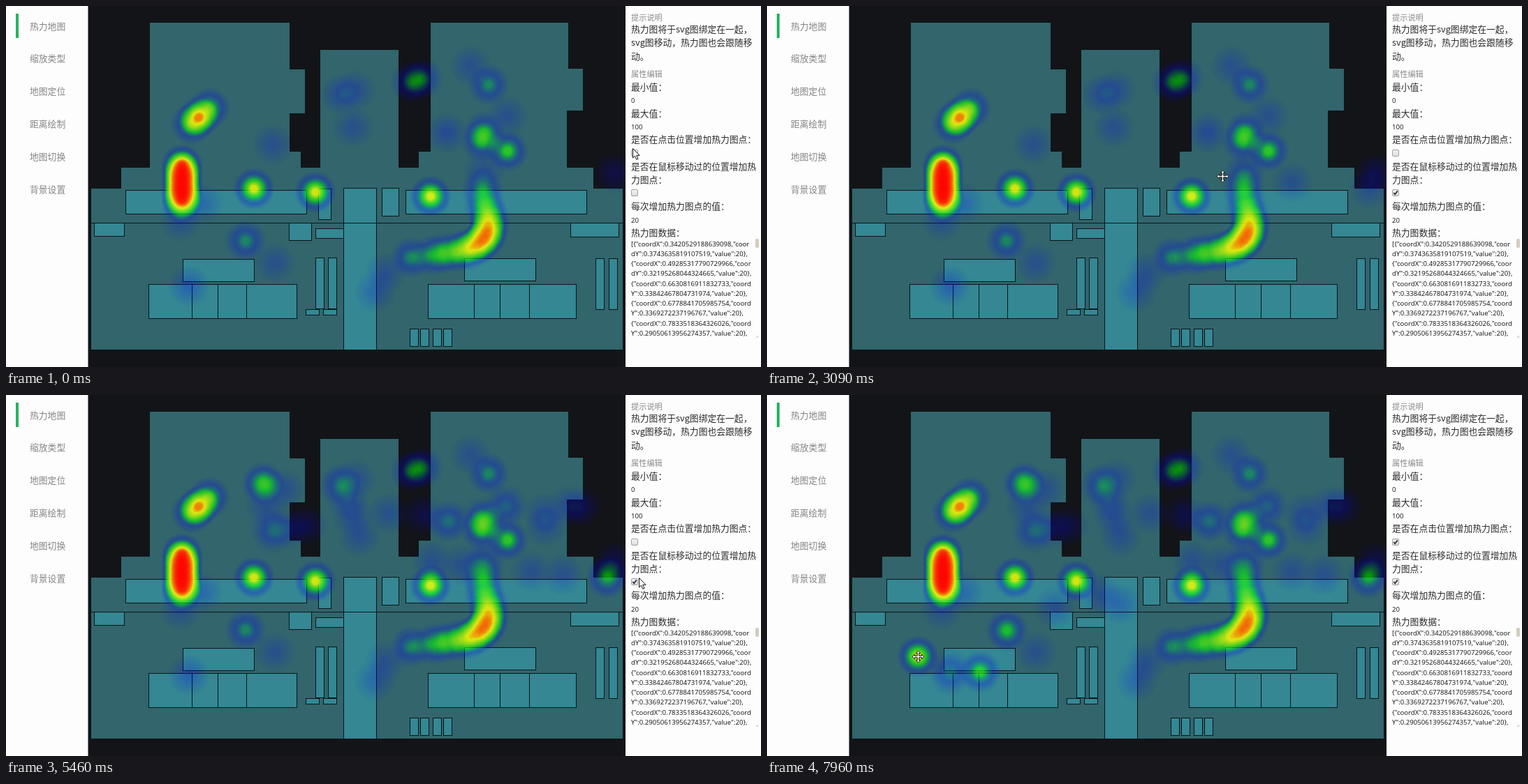
These frames come from a looping animation (1081 px wide and 518 px high, 8000 ms). An HTML page with a canvas:

```html
<!DOCTYPE html>
<html lang="zh-CN">
<head>
<meta charset="utf-8">
<title>热力地图</title>
<style>
html, body { margin: 0; width: 100%; height: 100%; overflow: hidden; background: #fdfdfd; }
#stage { position: relative; width: 1081px; height: 518px; overflow: hidden; font-family: "Noto Sans CJK SC", "Noto Sans CJK", "Noto Sans", sans-serif; }
svg, canvas { position: absolute; left: 0; top: 0; }
.plan { stroke: #0c1618; }
.row { position: absolute; line-height: 20px; white-space: pre; }
.nav { left: 34px; font-size: 12.8px; color: #858585; }
.head { left: 895px; font-size: 11.2px; color: #8a8a8a; }
.body { left: 895px; font-size: 12.8px; color: #2c2c2c; }
.num { left: 895px; font: 9.6px/20px "Open Sans", "Noto Sans", sans-serif; color: #111; }
.bar { position: absolute; left: 14px; top: 11px; width: 4px; height: 35px; background: #27b162; }
#data { position: absolute; left: 895px; top: 334.6px; width: 180px; height: 141px; margin: 0; overflow: hidden; font: 9.6px/14.25px "Open Sans", "Noto Sans", sans-serif; color: #111; }
.thumb { position: absolute; left: 1073px; top: 334px; width: 5px; height: 13px; border-radius: 2px; background: #d3ccc2; }
</style>
</head>
<body>
<div id="stage">
  <svg class="plan" width="1081" height="518">
    <path fill="#131417" stroke="none" d="M117.5 0H887V518H117.5Z"/>
    <path fill="#32656c" d="M205.5 23.5H406.5V90.5H428.5V154.5H406.5V208.5H422.5V231.5H449.5V62.5H562.5V231.5H590.5V208.5H607.5V23.5H805.5V89.5H826.5V150.5H803.5V231.5H841.5V261.5H883.5V493.5H121.5V261.5H164.5V231.5H205.5Z"/>
    <g id="rooms" fill="#348793"></g>
    <path id="walls" d="M121.5 311.5H883.5"/>
  </svg>
  <canvas id="heat" width="769" height="518" style="left:118px"></canvas>
  <div class="bar"></div>
  <pre id="data">[{"coordX":0.3420529188639098,"coor
dY":0.3743635819107519,"value":20},
{"coordX":0.49285317790729966,"coor
dY":0.32195268044324665,"value":20},
{"coordX":0.6630816911832733,"coord
Y":0.33842467804731974,"value":20},
{"coordX":0.6778841705985754,"coord
Y":0.3369272237196767,"value":20},
{"coordX":0.7833518364326026,"coord
Y":0.29050613956274357,"value":20},</pre>
  <div class="thumb"></div>
  <svg width="1081" height="518">
    <defs>
      <linearGradient id="face" x2="0" y2="1"><stop stop-color="#f4f4f4"/><stop offset="1" stop-color="#dcdcdc"/></linearGradient>
      <rect id="box" x=".5" y=".5" width="9" height="9" rx="1.5" fill="url(#face)" stroke="#a0a0a0"/>
      <path id="tick" d="M2.3 5L4.2 7.3L7.8 2.4" fill="none" stroke="#333" stroke-width="1.8"/>
    </defs>
    <use href="#box" x="895" y="206"/>
    <use href="#box" x="895" y="263"/>
    <use id="clickTick" href="#tick" x="895" y="206"/>
    <use id="moveTick" href="#tick" x="895" y="263"/>
    <path d="M1074 476L1077 473M1076 476L1077 475" stroke="#999" stroke-width=".7"/>
    <g id="cursor" fill="#fff" stroke="#111" stroke-linejoin="round">
      <path id="arrow" d="M0 0V13.5L3 10.6L5.2 15.8L7.5 14.8L5.3 9.8H9.6Z"/>
      <g id="cross"></g>
    </g>
  </svg>
</div>
<script>
const LOOP = 8000, RADIUS = 30, LEFT = 118, EDGE = 887, STEP = .2;
const $ = id => document.getElementById(id);
const pairs = s => s.split(" ").map(p => p.split(",").map(Number));

function room(w, h, corners) {
  $("rooms").innerHTML += pairs(corners).map(([x, y]) =>
    `<rect x="${x + .5}" y="${y + .5}" width="${w}" height="${h}"/>`).join("");
}
room(259, 34, "171,264 572,264");
room(18, 44, "447,262");
room(47, 232, "483,261");
room(24, 40, "538,261");
room(43, 19, "126,311");
room(32, 25, "405,311");
room(40, 14, "443,319");
room(69, 20, "808,311");
room(102, 32, "253,363 656,362");
room(212, 49, "204,399 604,399");
room(12, 73, "443,361 461,361 844,362 863,362");
room(19, 8, "429,435 454,435");
room(12, 25, "578,463 593,463 611,463 626,463");

const walls = [266, 303, 344, 670, 707, 749].map(x => `M${x}.5 399V448`).join("");
$("walls").setAttribute("d", $("walls").getAttribute("d") + walls);

// four arms, one per direction
const arm = "L-1.2 -1.2V-5H-3.2L0 -8.5L3.2 -5H1.2V-1.2";
const turned = (part, stroke) => [0, 90, 180, 270].map(a =>
  `<path d="M0 0${part}" transform="rotate(${a})" stroke="${stroke}"/>`).join("");
$("cross").innerHTML = turned(arm, "#111") + `<rect x="-1.2" y="-1.2" width="2.4" height="2.4" stroke="none"/>`;

function row(kind, y, text) {
  const el = document.createElement("div");
  el.className = "row " + kind;
  el.style.top = y - 10.5 + "px";
  el.textContent = text;
  $("stage").append(el);
}
["热力地图", "缩放类型", "地图定位", "距离绘制", "地图切换", "背景设置"]
  .forEach((s, i) => row("nav", 29 + i * 46.8, s));
row("head", 16, "提示说明");
row("body", 33.5, "热力图将于svg图绑定在一起，");
row("body", 52.5, "svg图移动，热力图也会跟随移");
row("body", 72, "动。");
row("head", 97.5, "属性编辑");
row("body", 116, "最小值：");
row("num", 136, "0");
row("body", 154, "最大值：");
row("num", 174.5, "100");
row("body", 191.5, "是否在点击位置增加热力图点：");
row("body", 230, "是否在鼠标移动过的位置增加热");
row("body", 249, "力图点：");
row("body", 287, "每次增加热力图点的值：");
row("num", 308, "20");
row("body", 325, "热力图数据：");

const base = [];
const spots = (v, list) => base.push(...pairs(list).map(p => [...p, v]));
spots(.2, "250,308 281,283 382,199 385,369 500,121 497,174 665,86 718,158 684,238 684,275 871,240 543,383 529,410");
spots(.25, "262,402 480,127 631,182");
spots(.38, "580,110 596,104 610,358 682,262 252,284");
spots(.45, "343,337 691,113 685,181 681,194 580,361");
spots(.6, "291,147 266,169 718,208");
spots(.83, "276,160 355,262 443,267 608,273");
for (let y = 228; y < 280; y += 10) base.push([252, y, .9]);
for (let i = 0; i <= 8; i++) {
  const t = i / 8, u = 1 - t;
  const bend = (a, b, c) => u * u * a + 2 * u * t * b + t * t * c;
  base.push([bend(686, 712, 625), bend(288, 350, 355), .42 + .25 * Math.sin(Math.PI * t)]);
}

// Cursor positions; a hot one leaves a heat point once the cursor steps on.
const path = [];
function visit(start, gap, points, hot = true) {
  points.forEach(([x, y], i) => path.push({ time: start + i * gap, x, y, hot }));
}
const hover = (start, gap, list) => visit(start, gap, pairs(list));
function glide(start, gap, steps, list) {
  const way = pairs(list), last = way.length - 1;
  visit(start, gap, Array.from({ length: steps }, (_, i) => {
    const s = steps > 1 ? i / (steps - 1) * last : 0;
    const n = Math.max(0, Math.min(last - 1, Math.floor(s)));
    const a = way[n], b = way[n + 1] ?? a;
    return a.map((c, k) => Math.round(c + (b[k] - c) * (s - n)));
  }), false);
}
glide(0, 0, 1, "897,204");
glide(90, 78, 8, "895,208 886,235 899,264");
glide(890, 86, 4, "900,258 900,267");
glide(2610, 0, 1, "903,267");
hover(2850, 80, "862,262 752,253 683,246 652,244");
hover(3150, 110, "610,238 506,203 430,188 403,192 380,190");
hover(3680, 70, "372,158 367,130 367,125");
hover(4100, 44, "370,127 370,127 398,135 478,132 490,152 548,170 597,172 637,180 681,175 713,162 770,170 824,160 805,160");
hover(4690, 170, "773,188 797,258");
hover(5030, 100, "862,262 858,262");
glide(5280, 0, 1, "903,268");
glide(5460, 82, 10, "906,262 899,209 899,271");
glide(6290, 76, 4, "897,272 892,272");
glide(6670, 0, 1, "661,296");
hover(6760, 82, "505,300 478,286 412,305 345,340 305,397 305,397 305,397 262,393 216,375");
hover(7510, 180, "216,375 216,375");
hover(7780, 180, "216,375 216,375");

// blue, green, yellow, red
const stops = [[0, 0, 0, 255], [.25, 0, 0, 255], [.55, 0, 255, 0], [.85, 255, 255, 0], [1, 255, 0, 0]];
const palette = Array.from({ length: 256 }, (_, n) => {
  const v = n / 255;
  const i = Math.max(1, stops.findIndex(s => s[0] >= v));
  const a = stops[i - 1], b = stops[i], k = (v - a[0]) / (b[0] - a[0]);
  return [1, 2, 3].map(c => a[c] + (b[c] - a[c]) * k);
});

const canvas = $("heat");
const ctx = canvas.getContext("2d", { willReadFrequently: true });

function drawHeat(points) {
  const merged = new Map();
  for (const [x, y, v] of points) {
    const key = x + "," + y;
    merged.set(key, [x - LEFT, y, v + (merged.get(key)?.[2] ?? 0)]);
  }
  ctx.clearRect(0, 0, canvas.width, canvas.height);
  for (const [x, y, v] of merged.values()) {
    const g = ctx.createRadialGradient(x, y, RADIUS * .15, x, y, RADIUS);
    g.addColorStop(0, "rgba(0,0,0,1)");
    g.addColorStop(1, "rgba(0,0,0,0)");
    ctx.globalAlpha = Math.min(1, v);
    ctx.fillStyle = g;
    ctx.fillRect(x - RADIUS, y - RADIUS, RADIUS * 2, RADIUS * 2);
  }
  const img = ctx.getImageData(0, 0, canvas.width, canvas.height), d = img.data;
  for (let i = 0; i < d.length; i += 4) {
    if (d[i + 3]) [d[i], d[i + 1], d[i + 2]] = palette[d[i + 3]];
  }
  ctx.putImageData(img, 0, 0);
}

const show = (id, on) => { $(id).style.display = on ? "" : "none"; };
let drawn = -1;

function render(t) {
  const now = path.findLastIndex(p => p.time <= t);
  const live = path.slice(0, now).filter(p => p.hot);
  if (live.length !== drawn) {
    drawn = live.length;
    drawHeat([...base, ...live.map(p => [p.x, p.y, STEP])]);
  }
  const { x, y } = path[now];
  $("cursor").setAttribute("transform", `translate(${x + .5} ${y + .5})`);
  show("arrow", x >= EDGE - 1);
  show("cross", x < EDGE - 1);
  show("moveTick", t >= 2430);
  show("clickTick", t >= 5900);
}

const begin = performance.now();
function tick() {
  render((performance.now() - begin) % LOOP);
  requestAnimationFrame(tick);
}
tick();
</script>
</body>
</html>
```
